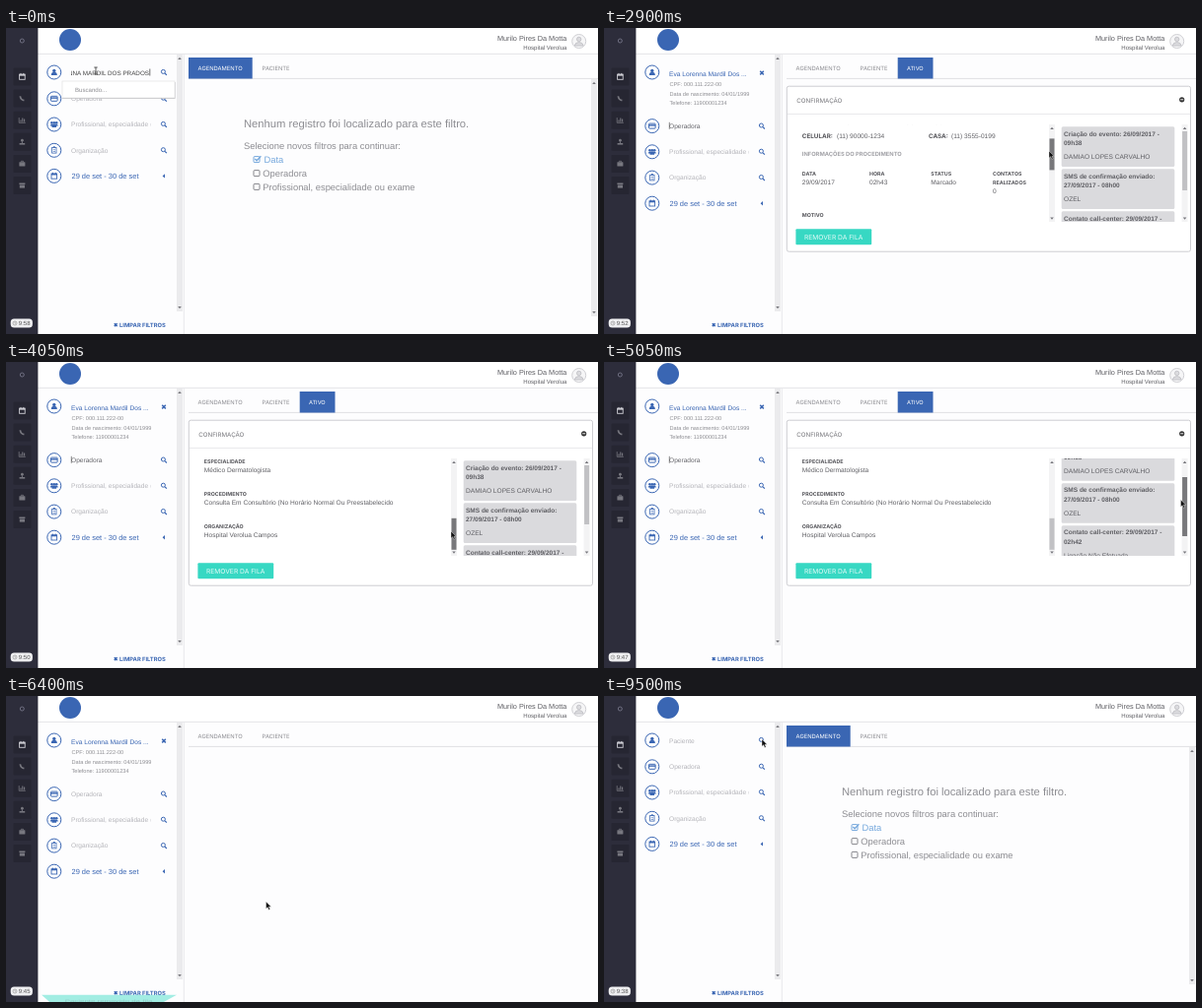
Recreate the animation shown at these times as an HTML page. Size 600x311 px, loop 9550 ms.

```html
<!DOCTYPE html>
<html lang="pt-BR">
<head>
<meta charset="utf-8">
<title>Agendamento</title>
<style>
html, body { margin: 0; width: 100%; height: 100%; overflow: hidden; background: #fdfdfe; }
svg { display: block; width: 600px; height: 311px; }
text { font-family: "Liberation Sans", Arial, sans-serif; white-space: pre; text-rendering: geometricPrecision; }
.m { font-family: Inter, sans-serif; }
.b { font-weight: 700; }
</style>
</head>
<body>
<svg id="stage" viewBox="0 0 600 311"></svg>
<script>
const BLUE = '#3a66b3', DARK = '#5f5f64', GREY = '#8d8d92', PALE = '#b4b4b9', LOOP = 9550;

// Markup helpers
const text = (x, y, s, size, fill, extra = '') =>
  `<text x="${x}" y="${y}" font-size="${size}" fill="${fill}" ${extra}>${s}</text>`;
const M = 'class="m"', MB = 'class="m b"', B = 'class="b"';
const rect = (x, y, w, h, fill, extra = '') =>
  `<rect x="${x}" y="${y}" width="${w}" height="${h}" fill="${fill}" ${extra}/>`;
const path = (d, fill, extra = '') => `<path d="${d}" fill="${fill}" ${extra}/>`;
const line = (d, color, w = 1) => path(d, 'none', `stroke="${color}" stroke-width="${w}"`);
const group = (id, body, extra = '') => `<g id="${id}" ${extra}>${body}</g>`;
const clip = (id, x, y, w, h) => `<clipPath id="${id}">${rect(x, y, w, h, '#000')}</clipPath>`;
const arrow = (x, y, up) => path(`M${x - 1.8} ${y}h3.6l-1.8 ${up ? -2.2 : 2.2}z`, '#77777c');

// Icons around their own centre
const icons = {
  user: c => `<circle cy="-1.6" r="1.7" fill="${c}"/>` + path('M-3 3q0-3.2 3-3.2t3 3.2z', c),
  card: c => rect(-3.3, -2.5, 6.6, 5, 'none', `stroke="${c}" rx=".6"`) + rect(-3.3, -1.4, 6.6, 1.4, c),
  group: c => [-2.4, 2.4, 0].map(x => `<circle cx="${x}" cy="-1.6" r="1.3" fill="${c}"/>`).join('') +
    path('M-4 1.6q0-1.9 2-1.9h4q2 0 2 1.9h-1.7v1.4h-4.6v-1.4z', c),
  building: c => rect(-2.2, -2.8, 4.4, 5.6, 'none', `stroke="${c}" stroke-width=".8"`) +
    rect(-.9, -4, 1.8, 1.6, c) + line('M-1-.6h2M-1 1.2h2', c, .7),
  calendar: c => rect(-2.8, -2.4, 5.6, 5.2, 'none', `stroke="${c}" stroke-width=".9"`) +
    rect(-2.8, -2.4, 5.6, 1.5, c) + line('M-1.4-3.6v1.6M1.4-3.6v1.6', c),
  phone: c => line('M-2-2.3q.3 3.6 4 4.4', c, 1.7),
  chart: c => line('M-3.2-2.6v5.2h6.6', c, .8) + line('M-1.4 1.8v-2M.4 1.8v-4M2.2 1.8v-3', c, 1.1),
  anchor: c => `<circle cy="-1.6" r="1.4" fill="${c}"/>` + line('M0-.6v2.2', c) + path('M-2.8 2.8v-1.6h5.6v1.6z', c),
  bag: c => rect(-3, -1.6, 6, 4.2, c, 'rx=".5"') + line('M-1.1-1.6v-1h2.2v1', c, .8),
  box: c => rect(-3, -2.5, 6, 1.6, c) + rect(-2.6, -.4, 5.2, 3, c),
};
const icon = (name, x, y, c) => `<g transform="translate(${x} ${y})">${icons[name](c)}</g>`;
const ring = (name, y) =>
  `<circle cx="48.8" cy="${y}" r="7" fill="#fff" stroke="${BLUE}"/>` + icon(name, 48.8, y, BLUE);
const lens = y =>
  `<circle cx="159.4" cy="${y - .6}" r="2" fill="none" stroke="${BLUE}"/>` +
  line(`M161 ${y + 1}l1.9 1.9`, BLUE, 1.2);
const cross = (x, y, r) => line(`M${x - r} ${y - r}l${2 * r} ${2 * r}m0 ${-2 * r}l${-2 * r} ${2 * r}`, BLUE, 1.5);

// Page frame
const sidebar = rect(0, 0, 32.4, 311, '#2d2d3b') +
  '<circle cx="16.3" cy="13" r="2" fill="none" stroke="#77778a" stroke-width=".9"/>' +
  ['calendar', 'phone', 'chart', 'anchor', 'bag', 'box'].map((n, i) => {
    const y = 49.5 + i * 22.1;
    return rect(7.5, y - 9, 18, 18, '#262632', 'rx="1"') + icon(n, 16.4, y, i ? '#77777f' : '#d0d0d6');
  }).join('') +
  rect(4.7, 295.4, 22.2, 9.2, '#f0f0f2', 'rx="3.5"') +
  '<circle cx="9" cy="300" r="2" fill="none" stroke="#999" stroke-width=".7"/>' +
  line('M9 298.7v1.5h1', '#999', .6) +
  text(12.8, 302.2, '', 6, '#555', 'id="clock"');

const header = rect(32, 0, 568, 26, '#fff') + line('M32 26.3h568', '#e4e4e7') +
  `<circle cx="65" cy="12" r="11" fill="${BLUE}"/>` +
  text(568.4, 12.8, 'Murilo Pires Da Motta', 7.33, DARK, 'text-anchor="end"') +
  text(568.4, 22, 'Hospital Verolua', 6.05, DARK, 'text-anchor="end"') +
  '<circle cx="580.7" cy="13.5" r="7" fill="#f6f6f7" stroke="#d0d0d4"/>' +
  '<circle cx="580.7" cy="11.4" r="2.2" fill="#dcdcdf" stroke="#bcbcc1" stroke-width=".8"/>' +
  path('M576.3 18q.4-3.4 4.4-3.4t4.4 3.4z', '#dcdcdf', 'stroke="#bcbcc1" stroke-width=".8"');

const bar = (x, y, h) => rect(x, y, 6, h, '#ebebed') + arrow(x + 3, y + 5, 1) + arrow(x + 3, y + h - 5, 0);

// Filters
const filters = bar(173, 27, 261) + line('M180.3 27v284', '#e8e8eb') + ring('user', 45) +
  group('idle', text(66, 48, 'Paciente', 6.6, PALE)) +
  group('lens', lens(45)) +
  group('patient', text(66, 48.8, 'Eva Lorenna Mardil Dos ...', 6.65, BLUE) + cross(160, 45.6, 1.8) +
    ['CPF: 000.111.222-00', 'Data de nascimento: 04/01/1999', 'Telefone: 11900001234']
      .map((s, i) => text(66.5, 59.4 + i * 9.1, s, 5.6, GREY)).join('')) +
  group('rest',
    ring('card', 71.8) + text(66, 74.2, 'Operadora', 6.6, PALE, 'id="operator"') + lens(71.8) +
    group('caret', line('M66.3 68v7', '#555', .7)) +
    ring('group', 98) + text(66, 100.4, 'Profissional, especialidade ou exame', 6.6, PALE, 'clip-path="url(#field)"') + lens(98) +
    ring('building', 124.3) + text(66, 126.7, 'Organização', 6.6, PALE) + lens(124.3) +
    ring('calendar', 150.4) + text(66.5, 153, '29 de set - 30 de set', 7.46, BLUE) +
    path('M161 148.2v4.4l-2.4-2.2z', BLUE)) +
  group('search',
    text(145, 47.8, 'EVA LORENNA MARDIL DOS PRADOS', 6.3, '#444', 'text-anchor="end" clip-path="url(#field)"') +
    line('M145.8 41.5v7', '#333', .7) +
    rect(57, 55, 114.5, 16.8, '#bcbcc0') + rect(57, 54, 114, 17, '#fff', 'stroke="#ddd" stroke-width=".6"') +
    text(70, 64.5, 'Buscando...', 6.1, GREY, 'id="hint"')) +
  cross(111.2, 301.7, 1.4) + text(115, 303.9, 'LIMPAR FILTROS', 5.8, BLUE, MB) +
  group('toast', path('', '#41dcc7', 'id="flap"') +
    group('note', text(104, 0, 'Paciente removido da fila', 7.9, '#178f83', 'text-anchor="middle"')));

// Tabs and empty result
const tabs = line('M185 51.4h415', '#e0e0e3') +
  group('tabFirst', rect(185, 30, 64.7, 21.5, BLUE)) +
  text(194.6, 42.8, 'AGENDAMENTO', 5.82, GREY, M + ' id="first"') +
  text(259.6, 42.8, 'PACIENTE', 5.82, GREY, M) +
  group('tabActive', rect(297.7, 30, 35.8, 21.5, BLUE) + text(307, 42.8, 'ATIVO', 5.7, '#fff', M));

const check = (y, s, on) => {
  const c = on ? '#74a7dc' : '#85858a';
  return rect(251, y - 6.4, 6, 6, 'none', `rx="1" stroke="${c}"`) +
    (on ? line(`M252.3 ${y - 4}l1.8 1.8l4.3-4.6`, c, 1.3) : '') +
    text(on ? 261.5 : 260.3, y, s, 9.36, on ? c : GREY);
};
const empty = bar(593, 52, 241) +
  text(241, 101, 'Nenhum registro foi localizado para este filtro.', 11.22, GREY) +
  text(241, 123.3, 'Selecione novos filtros para continuar:', 9.38, GREY) +
  check(137, 'Data', 1) + check(151, 'Operadora') + check(164.8, 'Profissional, especialidade ou exame');

// Confirmation panel
const label = (x, y, s) => text(x, y, s, 5.3, '#55555a', MB);
const value = (x, y, s) => text(x, y, s, 6.6, DARK);
const title = (y, s) => text(200.8, y, s, 5.75, '#a2a2a7', MB);
const pair = (y, a, b) => label(200.8, y, a) + value(200.8, y + 9.5, b);
const details =
  title(109.7, 'INFORMAÇÕES DO PACIENTE') +
  text(200.8, 120.6, 'NOME:', 5.8, '#55555a', MB) + text(227.5, 120.8, 'EVA LORENNA MARDIL DOS PRADOS', 6.5, DARK) +
  text(200.8, 134.8, 'CELULAR:', 6.3, '#55555a', MB) + value(236, 134.9, '(11) 90000-1234') +
  text(329, 134.8, 'CASA:', 6.3, '#55555a', MB) + value(352, 134.9, '(11) 3555-0199') +
  title(153.4, 'INFORMAÇÕES DO PROCEDIMENTO') +
  pair(173, 'DATA', '29/09/2017') +
  label(269, 173, 'HORA') + value(269, 182.5, '02h43') +
  label(331.3, 173, 'STATUS') + value(331.3, 182.5, 'Marcado') +
  label(394, 173, 'CONTATOS') + label(394, 182.3, 'REALIZADOS') + value(394, 191.6, '0') +
  label(200.8, 215, 'MOTIVO') +
  pair(238.5, 'PROFISSIONAL', 'Lusiane Prata Vermolo') +
  pair(271.4, 'ESPECIALIDADE', 'Médico Dermatologista') +
  pair(304.1, 'PROCEDIMENTO', 'Consulta Em Consultório (No Horário Normal Ou Preestabelecido') +
  pair(337, 'ORGANIZAÇÃO', 'Hospital Verolua Campos');

const events = [
  ['Criação do evento: 26/09/2017 -', '09h38', 'DAMIAO LOPES CARVALHO'],
  ['SMS de confirmação enviado:', '27/09/2017 - 08h00', 'OZEL'],
  ['Contato call-center: 29/09/2017 -', '02h42', 'Ligação Não Efetuada'],
].map((e, i) => {
  const y = 100.3 + i * 43;
  return rect(463.7, y, 114.6, 40.6, '#dadadd', 'rx="1.5"') +
    text(466, y + 9.2, e[0], 6.5, DARK, B) + text(466, y + 18.4, e[1], 6.5, DARK, B) + value(466, y + 32.3, e[2]);
}).join('');

const scroller = (x, id, h) => rect(x, 98, 6, 99, '#f3f3f4') + arrow(x + 3, 103, 1) + arrow(x + 3, 192.5, 0) +
  rect(x + .5, 105, 5, h, '#c1c1c4', `id="${id}"`);
const panel = rect(185.3, 59.2, 409.2, 168, '#fff', 'rx="2" stroke="#cdcdd1"') +
  line('M186 87.4h408', '#e8e8eb') +
  text(195.3, 75.6, 'CONFIRMAÇÃO', 6.2, '#77777c', M) +
  '<circle cx="585.7" cy="72.8" r="2.6" fill="#333"/>' + line('M584.2 72.8h3', '#fff', .9) +
  `<g clip-path="url(#left)">${group('details', details)}</g>` + scroller(451, 'thumbL', 32) +
  `<g clip-path="url(#right)">${group('events', events)}</g>` + scroller(585.6, 'thumbR', 60) +
  rect(194.4, 204.3, 76.8, 16, '#37d8c3', 'rx="1"') + text(203, 214.6, 'REMOVER DA FILA', 6.7, '#e6fbf8', M);

const stage = document.getElementById('stage');
stage.innerHTML =
  `<defs>${clip('field', 66, 30, 80.5, 150)}${clip('left', 190, 98, 258, 99)}${clip('right', 462, 98, 119, 99)}</defs>` +
  rect(0, 0, 600, 311, '#fdfdfe') + tabs + group('empty', empty) + group('panel', panel) +
  filters + header + sidebar +
  group('beam', line('M89.3 40h3.4M91 40v7M89.3 47h3.4', '#333', .8)) +
  group('cursor', path('M0 0v7.2l1.7-1.5l1.2 2.7l1.3-.6l-1.2-2.6h2.3z', '#111', 'stroke="#fff" stroke-width=".4"'));

const el = {};
stage.querySelectorAll('[id]').forEach(e => el[e.id] = e);
const show = (id, on) => el[id].style.display = on ? '' : 'none';
const set = (id, name, v) => el[id].setAttribute(name, v);

// Keys are [time, value, ...]; the result is interpolated linearly
function track(keys, t) {
  let i = keys.findIndex(k => k[0] > t);
  if (i < 0) return keys[keys.length - 1].slice(1);
  if (!i) return keys[0].slice(1);
  const a = keys[i - 1], b = keys[i], p = (t - a[0]) / (b[0] - a[0]);
  return a.slice(1).map((v, j) => v + (b[j + 1] - v) * p);
}
const seconds = [[0, 58], [1500, 54], [2900, 52], [3550, 51], [5050, 47], [6400, 45], [9500, 38]];
const dragL = [[2550, 105], [2900, 112.4], [3550, 137.4], [4050, 158.8]];
const dragR = [[4850, 105], [5050, 117], [5150, 121]];
const mouse = [[300, 91, 43], [550, 100, 62], [1000, 100, 62], [1500, 174, 69], [1750, 174, 69],
  [2300, 451, 118], [2550, 451, 118], [2900, 451, 125], [3550, 451, 150], [4050, 451, 172], [4200, 451, 172],
  [4700, 585, 128], [4850, 585, 128], [5050, 584.5, 140], [5150, 584.5, 144], [5350, 584.5, 144],
  [5400, 215, 207], [5950, 215, 207], [6350, 263.5, 209], [6550, 263.5, 209], [7300, 366, 150], [7950, 366, 150], [8000, 160, 44]];
const rise = [[6300, 0], [6400, .2], [6600, 1], [8600, 1], [8900, 0]];

// The toast flips up from a tilted pose: its lower edge starts narrow and far away
function drawToast(p) {
  const top = 311 - 36 * p, h = 8 + 23 * p, inset = 18 * (1 - p);
  show('toast', p > 0);
  set('toast', 'opacity', .35 + .65 * p);
  set('flap', 'd', `M36 ${top}H173L${173 - inset * 1.6} ${top + h}H${36 + inset}z`);
  set('note', 'transform', `translate(0 ${top + h * .58}) scale(1 ${.3 + .7 * p})`);
}

function draw(t) {
  const during = (a, b) => t >= a && t < b;
  const chosen = during(550, 8500), focus = during(550, 5800), result = t < 550 || t >= 7500;
  show('search', t < 550);
  show('idle', t >= 8500);
  show('lens', !chosen);
  show('patient', chosen);
  set('rest', 'transform', `translate(0 ${chosen ? 27.8 : 0})`);
  set('operator', 'fill', focus ? '#66666b' : PALE);
  show('caret', during(1750, 5800));
  el.hint.textContent = t < 300 ? 'Buscando...' : 'EVA LORENNA MARDIL DOS PRADOS';

  show('tabFirst', result);
  set('first', 'fill', result ? '#fff' : GREY);
  show('empty', result);
  show('tabActive', during(750, 5800));
  show('panel', during(750, 5800));

  const [l] = track(dragL, t), [r] = track(dragR, t);
  set('thumbL', 'y', l);
  set('thumbL', 'fill', during(2300, 4250) ? '#78787b' : '#c1c1c4');
  set('details', 'transform', `translate(0 ${(105 - l) * 3.13})`);
  set('thumbR', 'y', r);
  set('thumbR', 'fill', during(4700, 5400) ? '#78787b' : '#c1c1c4');
  set('events', 'transform', `translate(0 ${(105 - r) * 1.67})`);
  drawToast(track(rise, t)[0]);

  const [x, y] = track(mouse, t);
  show('beam', t < 300);
  show('cursor', t >= 300 && !during(3500, 3700));
  set('cursor', 'transform', `translate(${x} ${y})`);
  el.clock.textContent = '9:' + Math.ceil(track(seconds, t)[0]);
}

const start = performance.now();
function tick() {
  draw(Math.floor((performance.now() - start) % LOOP / 50) * 50);
  requestAnimationFrame(tick);
}
tick();
</script>
</body>
</html>
```
